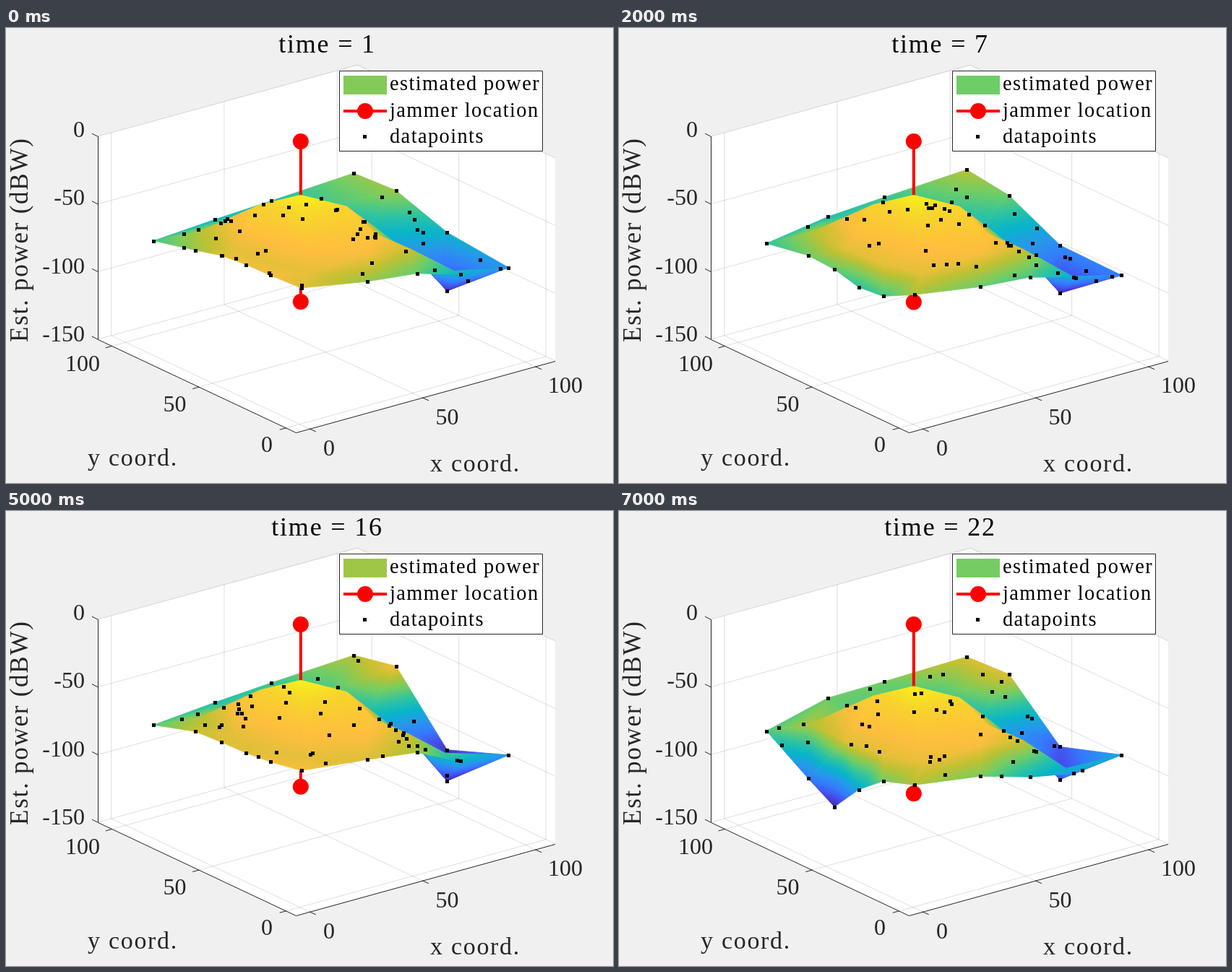
These frames come from a looping animation (840 px wide and 630 px high, 8 s). An HTML page with a canvas:

```html
<!DOCTYPE html>
<html lang="en">
<head>
<meta charset="utf-8">
<title>Estimated power</title>
<style>
html, body { margin: 0; overflow: hidden; background: #f0f0f0; }
canvas { display: block; }
</style>
</head>
<body>
<canvas id="stage" width="840" height="630"></canvas>
<script>
const ctx = document.getElementById('stage').getContext('2d');
const STEP = 1000, DOTS = 62, INK = '#262626', GRID = 'rgba(38,38,38,.15)', RED = '#f00';
const X0 = -6, X1 = 109, Y0 = -5.5, Y1 = 108.2, FLOOR = -150;
const JAMMER = [47.7, 61.3];
const PALETTE = ['#3e26a8', '#464bec', '#347afd', '#2797eb', '#08b4ca', '#2dc3a2', '#71cd64', '#bec132', '#febe3d', '#f7d62a', '#f9fb15'];

// Ground positions on the border of the surface: left, front, right, back.
const RIM = [[0, 84], [0, 60], [0, 45], [0, 31], [0, 17], [3, 3], [30, 0], [52, 0], [72, 1], [94, 2],
  [76, 14], [93, 36], [92, 64], [91, 87], [60, 94], [35, 94]];
// Inner positions with a fixed level in percent of the power range.
const INNER = [[...JAMMER, 97], [57, 47, 90], [52, 26, 83], [58, 12, 72], [73, 55, 45], [76, 32, 26], [68, 75, 52], [10, 72, 68],
  [35, 68, 88], [38, 82, 56], [7, 47, 76], [8, 27, 76], [28, 33, 82], [14, 12, 76], [40, 13, 79]];
const SITES = [...RIM, ...INNER];

const measure = (low, high, base, swatch, rim) => ({ low, high, base, swatch, rim });
const mean = (a, b) => (a + b) / 2;
const between = (a, b) => measure(mean(a.low, b.low), mean(a.high, b.high), mean(a.base, b.base),
  mean(a.swatch, b.swatch), a.rim.map((v, i) => mean(v, b.rim[i])));

// Power range (dBW), foot of the stem, legend level, and rim levels in percent.
const [a, b, c, d, e, f] = [
  measure(-96, -38, -118.5, 62.5, [53, 66, 75, 78, 79, 75, 65, 58, 40, 30, 2, 40, 65, 64, 46, 42]),
  measure(-97, -34, -118.5, 58, [51, 41, 38, 24, 28, 54, 46, 43, 35, 10, 0, 3, 50, 65, 53, 50]),
  measure(-97, -42, -119, 61, [50, 79, 78, 76, 78, 80, 72, 65, 40, 33, 2, 47, 69, 73, 50, 43]),
  measure(-95, -56, -135.5, 67, [70, 8, 82, 10, 50, 75, 74, 60, 44, 37, 10, 0, 88, 90, 67, 60]),
  measure(-100, -39.5, -120, 66, [56, 72, 74, 75, 78, 79, 75, 67, 40, 30, 0, 3, 78, 69, 52, 47]),
  measure(-103, -44, -125, 60.5, [55, 20, 0, 36, 61, 68, 61, 43, 31, 36, 7, 12, 75, 74, 60, 59])
];
const scenes = [a, b, between(b, c), c, d, e, between(e, f), f];

const project = (x, y, z) => [
  401 + 3.125 * (x - X0) - 2.41 * (y - Y0),
  560 - 0.861 * (x - X0) - 1.134 * (y - Y0) - 1.873 * (z - FLOOR)
];
const depth = ([x, y]) => 0.861 * x + 1.134 * y;
const cross = (p, q, r) => (q[0] - p[0]) * (r[1] - p[1]) - (q[1] - p[1]) * (r[0] - p[0]);

function inCircle(p, q, r, s) {
  const [u, v, w] = [p, q, r].map(([x, y]) => {
    const dx = x - s[0], dy = y - s[1];
    return [dx, dy, dx * dx + dy * dy];
  });
  const det = u[2] * (v[0] * w[1] - v[1] * w[0]) - v[2] * (u[0] * w[1] - u[1] * w[0]) + w[2] * (u[0] * v[1] - u[1] * v[0]);
  return det * cross(p, q, r) > 1e-6;
}

// Delaunay triangles of the sites, farthest first.
function triangulate(points) {
  const found = [], n = points.length;
  for (let i = 0; i < n; i++) for (let j = i + 1; j < n; j++) for (let k = j + 1; k < n; k++) {
    const t = [points[i], points[j], points[k]];
    if (cross(...t) && !points.some(p => !t.includes(p) && inCircle(...t, p)))
      found.push({ corners: [i, j, k], depth: t.reduce((sum, p) => sum + depth(p) / 3, 0) });
  }
  return found.sort((s, t) => t.depth - s.depth);
}
const mesh = triangulate(SITES);

const siteLevels = s => [...s.rim, ...INNER.map(p => p[2])].map(v => v / 100);
const height = (s, level) => s.low + (s.high - s.low) * level;

// Level of the surface above a ground point, undefined outside it.
function levelAt(levels, p) {
  for (const { corners } of mesh) {
    const [q, r, t] = corners.map(i => SITES[i]), area = cross(q, r, t);
    const share = [cross(p, r, t), cross(q, p, t), cross(q, r, p)].map(v => v / area);
    if (share.every(v => v >= 0)) return share.reduce((sum, v, i) => sum + v * levels[corners[i]], 0);
  }
}

function scatter(s, levels, seed) {
  const random = () => (seed = seed * 16807 % 2147483647) / 2147483647;
  const dots = RIM.map(([x, y], i) => project(x, y, height(s, levels[i])));
  while (dots.length < DOTS) {
    const p = [100 * random(), 100 * random()], level = levelAt(levels, p);
    if (level !== undefined) dots.push(project(...p, height(s, level)));
  }
  return dots;
}

function line(style, width, ...points) {
  ctx.strokeStyle = style;
  ctx.lineWidth = width;
  ctx.beginPath();
  points.forEach(p => ctx.lineTo(...p));
  ctx.stroke();
}

function text(str, x, y, size, align = 'left', spacing = 0.05, fill = INK) {
  ctx.font = size + 'px "Liberation Serif", serif';
  ctx.letterSpacing = size * spacing + 'px';
  ctx.textAlign = align;
  ctx.fillStyle = fill;
  ctx.fillText(str, x, y);
}

function disc(x, y) {
  ctx.fillStyle = RED;
  ctx.beginPath();
  ctx.arc(x, y, 11, 0, 7);
  ctx.fill();
}

function dot([x, y]) {
  ctx.fillStyle = '#000';
  ctx.fillRect(Math.round(x) - 2, Math.round(y) - 2, 5, 5);
}

// Palette gradient that runs from level 0 to level 1 between two points.
function ramp(x0, y0, x1, y1) {
  const g = ctx.createLinearGradient(x0, y0, x1, y1);
  PALETTE.forEach((colour, i) => g.addColorStop(i / 10, colour));
  return g;
}

function drawTriangle(s, levels, corners) {
  const [p, q, r] = corners.map(i => project(SITES[i][0], SITES[i][1], height(s, levels[i])));
  const [u, v, w] = corners.map(i => levels[i]), area = cross(p, q, r);
  if (Math.abs(area) < 1) return;
  const gx = ((v - u) * (r[1] - p[1]) - (w - u) * (q[1] - p[1])) / area;
  const gy = ((w - u) * (q[0] - p[0]) - (v - u) * (r[0] - p[0])) / area;
  const g2 = gx * gx + gy * gy + 1e-9;
  const x = p[0] - gx * u / g2, y = p[1] - gy * u / g2;
  ctx.fillStyle = ramp(x, y, x + gx / g2, y + gy / g2);
  line(ctx.fillStyle, 0.8, p, q, r, p);
  ctx.fill();
}

function drawAxes() {
  const rear = (x, y, z) => project(x, y, z);
  ctx.fillStyle = '#f0f0f0';
  ctx.fillRect(0, 0, 840, 630);
  ctx.fillStyle = '#fff';
  ctx.fill(new Path2D('M127,150 486,52 760,180 760,461 401,560 127,431Z'));
  for (let k = 0; k < 4; k++) {
    const z = k * -50, [x, y] = project(X0, Y1, z);
    line(GRID, 1, [x, y], project(X1, Y1, z), project(X1, Y0, z));
    line(INK, 1, [x, y], [x - 8, y - 4]);
    text(String(z), 109, 151 + k * 94.3, 32, 'right', 0);
  }
  for (let k = 0; k < 3; k++) {
    const v = k * 50, [x, y] = project(v, Y0, FLOOR), [l, m] = project(X0, v, FLOOR);
    line(GRID, 1, [x, y], project(v, Y1, FLOOR), project(v, Y1, 0));
    line(GRID, 1, [l, m], project(X1, v, FLOOR), project(X1, v, 0));
    line(INK, 1, [x, y], [x + 9, y + 4]);
    line(INK, 1, [l, m], [l - 9, m + 2.5]);
    text(String(v), 439 + k * 155.5, 592 - k * 43.5, 32, 'left', 0);
    text(String(v), 369 - k * 119.5, 587 - k * 56, 32, 'right', 0);
  }
  line(INK, 1, [127.5, 150], [127.5, 431.5], [401.5, 560.5], [760, 461.5]);
  text('y coord.', 113, 606, 34);
  text('x coord.', 587, 614, 34);
  ctx.save();
  ctx.translate(30, 435);
  ctx.rotate(-Math.PI / 2);
  text('Est. power (dBW)', 0, 0, 35);
  ctx.restore();
}

function drawStem(base) {
  const top = project(...JAMMER, 0), foot = project(...JAMMER, base);
  line(RED, 4, top, foot);
  disc(...top);
  disc(...foot);
}

function drawLegend(level) {
  ctx.fillStyle = '#fff';
  ctx.fillRect(461, 59, 281, 111);
  ctx.strokeStyle = INK;
  ctx.lineWidth = 1;
  ctx.strokeRect(461.5, 59.5, 281, 111);
  ctx.fillStyle = ramp(497 - level * 1e4, 0, 497 + (100 - level) * 1e4, 0);
  ctx.fillRect(467, 66, 60, 26);
  line(RED, 4, [467, 115], [527, 115]);
  disc(497, 115);
  dot([496, 150]);
  ['estimated power', 'jammer location', 'datapoints'].forEach((label, i) =>
    text(label, 531, 86 + i * 36.5, 28.4, 'left', 0.05, '#000'));
}

function draw(index) {
  const s = scenes[index], levels = siteLevels(s), isBehind = t => t.depth > depth(JAMMER);
  const paint = t => drawTriangle(s, levels, t.corners);
  drawAxes();
  text('time = ' + (1 + index * 3), 444.5, 34, 36, 'center', 0.05, '#000');
  mesh.filter(isBehind).forEach(paint);
  drawStem(s.base);
  mesh.filter(t => !isBehind(t)).forEach(paint);
  scatter(s, levels, 11 + index * 97).forEach(dot);
  drawLegend(s.swatch);
}

ctx.lineJoin = 'round';
let shown = -1;
function tick() {
  const index = Math.floor(performance.now() / STEP) % scenes.length;
  if (index !== shown) draw(shown = index);
  requestAnimationFrame(tick);
}
tick();
</script>
</body>
</html>
```
